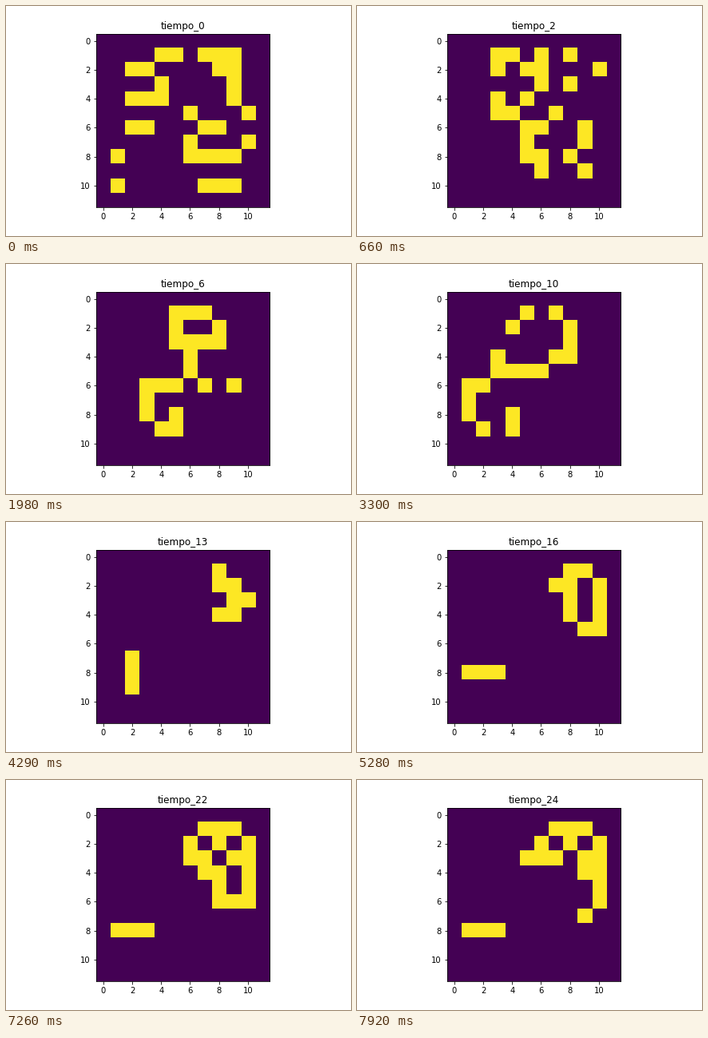
A matplotlib script that plays this animation: 432x288 px, repeating every 8000 ms.

```python
import numpy as np
import matplotlib.pyplot as plt
from matplotlib.animation import FuncAnimation

SIZE = 12
STEP_MS = 330
LOOP_MS = 8000
TICK_MS = 20


def first_grid():
    """Starting pattern, laid out as bars and evenly spaced repeats."""
    grid = np.zeros((SIZE, SIZE), int)
    grid[2:7:2, 2:4] = 1        # three short bars on the left
    grid[1, 4:6] = 1
    grid[3:5, 4] = 1
    grid[1, 7:10] = 1           # hook at the upper right
    grid[2, 8] = 1
    grid[2:5, 9] = 1
    grid[5:8:2, 6:11:4] = 1     # four corner cells
    grid[6, 7:9] = 1
    grid[8:11:2, 7:10] = 1      # twin bars at the bottom
    grid[8:11:2, 1] = 1
    grid[8, 6] = 1
    return grid


def next_grid(grid):
    """One step of the game of life; the outer ring stays dead."""
    near = sum(np.roll(grid, (dy, dx), (0, 1))
               for dy in (-1, 0, 1) for dx in (-1, 0, 1)) - grid
    alive = (near == 3) | ((grid == 1) & (near == 2))
    return np.pad(alive[1:-1, 1:-1].astype(int), 1)


grids = [first_grid()]
while len(grids) * STEP_MS < LOOP_MS:
    grids.append(next_grid(grids[-1]))

plt.rcParams.update({"font.family": "DejaVu Sans", "font.size": 10})
fig, ax = plt.subplots(figsize=(6, 4), dpi=72)
fig.subplots_adjust(left=0.125, right=0.9, bottom=0.125, top=0.88)
image = ax.imshow(grids[0], cmap="viridis", vmin=0, vmax=1,
                  interpolation="nearest")
ticks = range(0, SIZE, 2)
ax.set_xticks(ticks)
ax.set_yticks(ticks)
title = ax.set_title("tiempo_0", fontsize=12)


def update(i):
    # nearest tick to each generation change
    gen = (i * TICK_MS + TICK_MS // 2) // STEP_MS
    image.set_data(grids[gen])
    title.set_text(f"tiempo_{gen}")
    return image, title


anim = FuncAnimation(fig, update, frames=LOOP_MS // TICK_MS,
                     interval=TICK_MS, repeat=True, repeat_delay=0)
plt.show()
```
